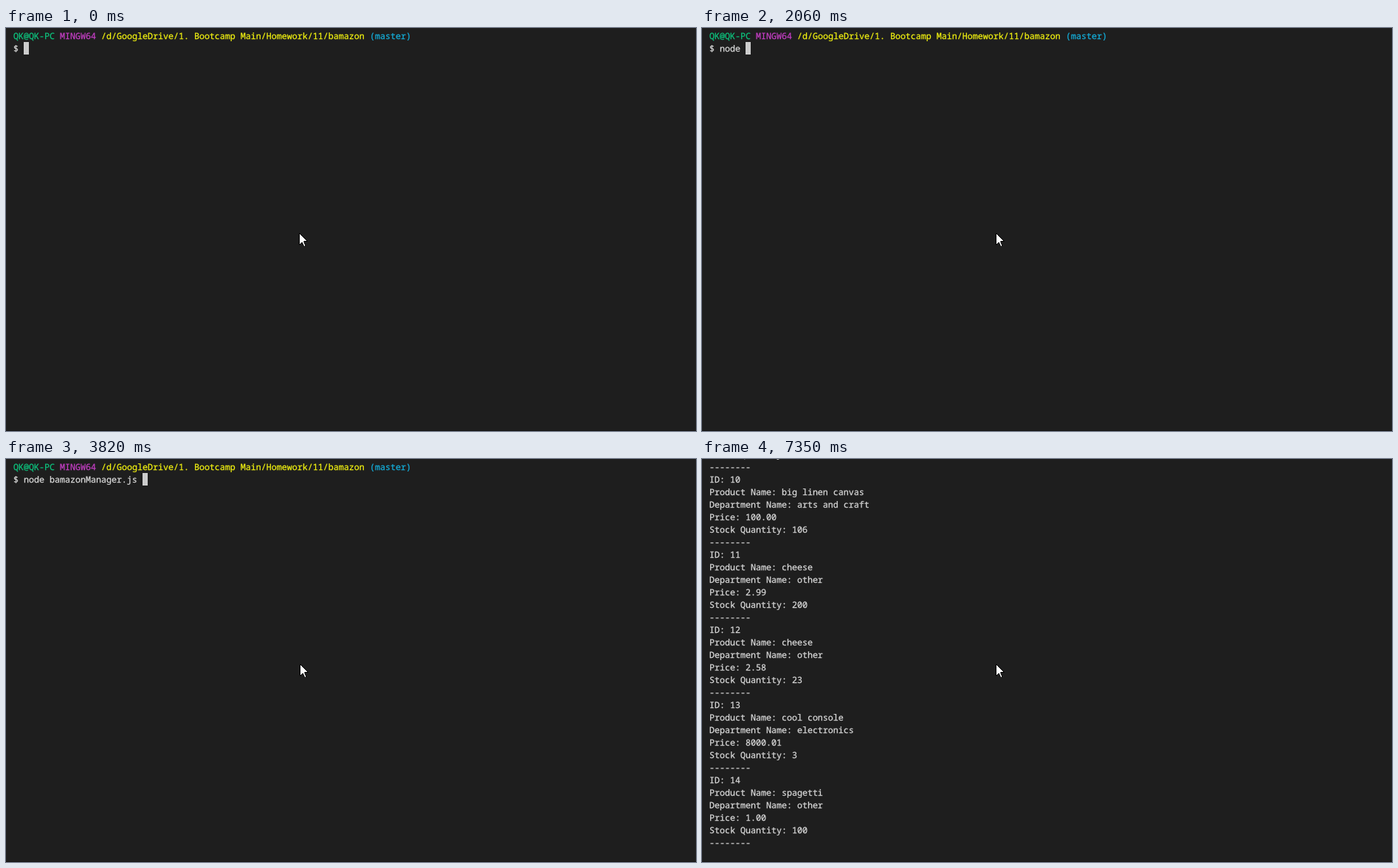
Recreate the animation shown at these times as an HTML page. Size 935 by 547 pixels, loop 8 s.

```html
<!DOCTYPE html>
<html lang="en">
<head>
<meta charset="utf-8">
<title>Terminal session</title>
<style>
html, body { margin: 0; width: 100%; height: 100%; overflow: hidden; background: #1e1e1e; }
svg { display: block; width: 935px; height: 547px; }
text {
  font: 11.6667px "Noto Sans Mono", "DejaVu Sans Mono", monospace;
  white-space: pre;
  text-rendering: geometricPrecision;
  font-variant-ligatures: none;
  stroke-width: .25px;
}
</style>
</head>
<body>
<svg viewBox="0 0 935 547">
  <rect width="935" height="547" fill="#1e1e1e"/>
  <rect y="546" width="935" height="1" fill="#151515"/>
  <rect id="caret" width="7" height="17" fill="#ccc"/>
  <g id="screen"></g>
  <path id="pointer" d="M.5 .5V16.5L4.2 13 6.5 18 7.5 18.5 8.7 18 8.5 16.5 6.8 12.5V11.5H11.5Z" fill="#fff" stroke="#000"/>
</svg>
<script>
const LOOP = 8000, LEFT = 10, TOP = 2, COL = 7, ROW = 17, BASE = 13;
const FG = '#dadada', GREEN = '#0dc47e', PURPLE = '#c63fc6', YELLOW = '#f2f210', CYAN = '#14b0dc';
const NS = 'http://www.w3.org/2000/svg';
const [caret, screen, pointer] = ['caret', 'screen', 'pointer'].map(id => document.getElementById(id));

const COMMAND = 'node bamazonManager.js ';
// [time, characters typed]
const TYPING = [[0, 0], [1170, 2], [1480, 4], [2060, 5], [2640, 6], [2950, 12], [3530, 13], [3820, 23]];
const ENTER = 4420, MENU = 5290, LIST = 7350;

// A line is a list of [text, colour, weight] runs.
const plain = s => [[s]];
const prompt = [
  ['QK@QK-PC ', GREEN], ['MINGW64 ', PURPLE],
  ['/d/GoogleDrive/1. Bootcamp Main/Homework/11/bamazon ', YELLOW], ['(master)', CYAN]
];
const menu = [
  plain('connected as id 145'),
  [['? ', GREEN], ['What would you like to do? ', FG, 700], ['(Use arrow keys)']],
  [['> List products for sale', CYAN]],
  ...['View low inventory', 'Add to inventory', 'Add new product', 'Exit'].map(s => plain('  ' + s))
];
const products = [
  [10, 'big linen canvas', 'arts and craft', '100.00', 106],
  [11, 'cheese', 'other', '2.99', 200],
  [12, 'cheese', 'other', '2.58', 23],
  [13, 'cool console', 'electronics', '8000.01', 3],
  [14, 'spagetti', 'other', '1.00', 100]
];
const rule = '--------';
const list = ['Stock Quantity:', rule, ...products.flatMap(([id, name, dept, price, stock]) => [
  `ID: ${id}`, `Product Name: ${name}`, `Department Name: ${dept}`,
  `Price: ${price}`, `Stock Quantity: ${stock}`, rule
])].map(plain);

function add(parent, tag, attrs) {
  const el = document.createElementNS(NS, tag);
  for (const k in attrs) el.setAttribute(k, attrs[k]);
  return parent.appendChild(el);
}

function show(lines, firstRow) {
  screen.textContent = '';
  lines.forEach((runs, i) => {
    const y = TOP + (firstRow + i) * ROW + BASE;
    let col = 0;
    for (const [str, fill = FG, weight = 400] of runs) {
      const x = LEFT + col * COL;
      const el = add(screen, 'text', { x, y, fill, stroke: fill, style: `font-weight:${weight}` });
      el.textContent = str;
      col += str.length;
    }
  });
}

let last = '';
function draw(t) {
  const typed = TYPING.filter(([at]) => at <= t).pop()[1];
  const stage = t >= LIST ? 'list' : t >= MENU ? 'menu' : t >= ENTER ? 'enter' : 'type';

  pointer.setAttribute('transform', `translate(${t < 300 ? 397 : 398} 278)`);

  const key = stage + typed;
  if (key === last) return;
  last = key;

  if (stage === 'list') show(list, -1);
  else show([prompt, plain('$ ' + COMMAND.slice(0, typed)), ...(stage === 'menu' ? menu : [])], 0);

  const [col, row] = stage === 'type' ? [2 + typed, 1] : [0, 2];
  caret.setAttribute('x', LEFT + col * COL);
  caret.setAttribute('y', TOP + row * ROW);
  caret.setAttribute('visibility', t < MENU ? 'visible' : 'hidden');
}

const start = performance.now();
function tick() {
  draw((performance.now() - start) % LOOP);
  requestAnimationFrame(tick);
}
tick();
</script>
</body>
</html>
```
